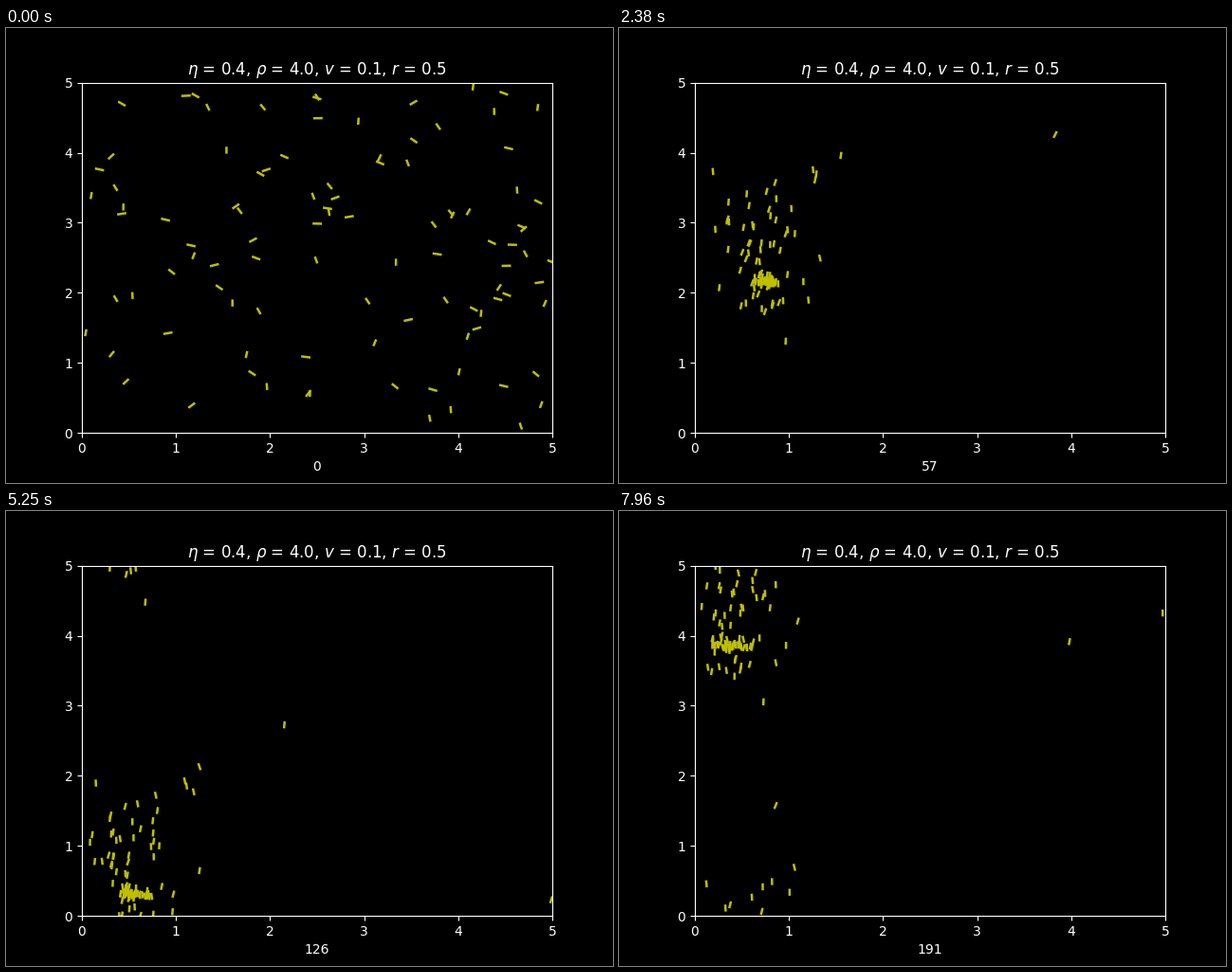
These frames come from a looping animation (640 by 480 pixels, 8 s). A matplotlib script:

```python
import numpy as np
import matplotlib.pyplot as plt
from matplotlib.animation import FuncAnimation
from matplotlib.collections import LineCollection

ETA, RHO, SPEED, RADIUS = 0.4, 4.0, 0.1, 0.5
SIZE = 5.0
COUNT = int(RHO * SIZE ** 2)
STEPS, LOOP = 192, 8000

MEET = np.array([1.1, 1.7])   # where the birds first gather
COLUMN = 0.45                 # x of the stream they settle into
DOWN = -np.pi / 2


def near(d):
    """Shortest offset in the periodic box."""
    return d - SIZE * np.round(d / SIZE)


def unit(angle):
    return np.stack([np.cos(angle), np.sin(angle)], axis=-1)


def fade(t, start, end):
    """Smooth fall from 1 to 0 between two steps."""
    s = np.clip((t - start) / (end - start), 0, 1)
    return 1 - s * s * (3 - 2 * s)


def gather(pos):
    """Flow towards the meeting point, sinking through it."""
    d = near(MEET - pos)
    f = d / (np.linalg.norm(d, axis=1, keepdims=True) + 0.5) + [0, -0.6]
    return f / np.linalg.norm(f, axis=1, keepdims=True)


def sink(pos, t):
    """Downward flow that leans gently towards the column."""
    lean = 0.3 * np.tanh(0.4 * (pos[:, 0] - COLUMN))
    return unit(DOWN - lean * (1 + 3 * np.exp(-t / 30)))


def simulate(seed):
    """Vicsek flock: follow the neighbours, add noise, drift with the flow."""
    rng = np.random.default_rng(seed)
    pos = rng.uniform(0, SIZE, (COUNT, 2))
    angle = rng.uniform(-np.pi, np.pi, COUNT)
    states = []
    for t in range(STEPS):
        states.append((pos, angle))
        gap = near(pos[:, None] - pos[None])
        close = (gap ** 2).sum(axis=2) < RADIUS ** 2
        mean = close @ unit(angle) / close.sum(axis=1, keepdims=True)
        early = fade(t, 12, 34)
        flow = early * gather(pos) + (1 - early) * sink(pos, t)
        x, y = (mean + (0.13 + 0.35 * early) * flow).T
        angle = np.arctan2(y, x) + rng.uniform(-ETA / 2, ETA / 2, COUNT)
        pos = (pos + SPEED * unit(angle)) % SIZE
    return states


states = simulate(4)

plt.style.use("dark_background")
plt.rcParams["font.family"] = "DejaVu Sans"
fig, ax = plt.subplots(figsize=(6.4, 4.8), dpi=100)
ax.set_xlim(0, SIZE)
ax.set_ylim(0, SIZE)
ax.set_title(rf"$\eta$ = {ETA}, $\rho$ = {RHO}, $v$ = {SPEED}, $r$ = {RADIUS}")
label = ax.set_xlabel("0")
marks = LineCollection([], colors="y", linewidths=1.8)
ax.add_collection(marks)


def draw(i):
    pos, angle = states[i]
    half = SPEED / 2 * unit(angle)
    marks.set_segments(np.stack([pos - half, pos + half], axis=1))
    label.set_text(str(i))
    return marks, label


anim = FuncAnimation(fig, draw, frames=STEPS, interval=LOOP / STEPS,
                     init_func=lambda: draw(0), repeat=True, repeat_delay=0)
plt.show()
```
